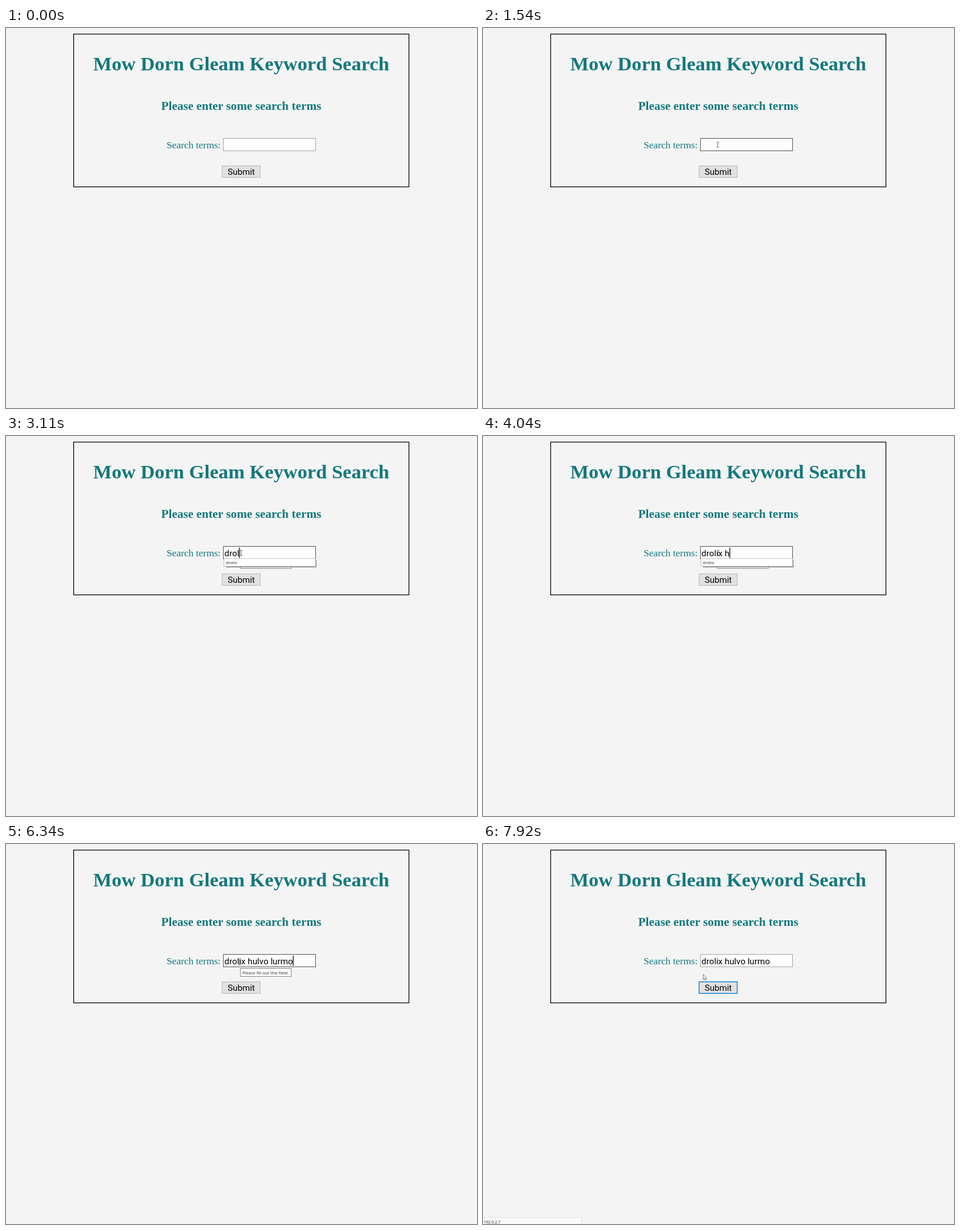
Animation of 833 by 673 pixels, one loop 7.99 s. Source, as an HTML page:

```html
<!DOCTYPE html>
<html lang="en">
<head>
<meta charset="utf-8">
<title>Keyword Search</title>
<style>
  html, body { margin: 0; width: 100%; height: 100%; overflow: hidden; background: #f4f4f4; }
  svg { display: block; width: 833px; height: 673px; }
  .serif { font-family: "Liberation Serif", serif; fill: #13787e; }
  .bold { font-weight: 700; }
  .mid { text-anchor: middle; }
  .ui { font-family: Roboto, sans-serif; font-size: 15.3px; fill: #000; }
  .small { font-family: "Noto Sans", sans-serif; font-size: 7.6px; fill: #333; }
  .crisp { shape-rendering: crispEdges; }
</style>
</head>
<body>
<svg viewBox="0 0 833 673">
  <rect width="833" height="673" fill="#f4f4f4"/>
  <rect x="119.6" y="10.8" width="593" height="270.6" fill="none" stroke="#000" stroke-width="1.3"/>
  <text class="serif bold mid" x="416" y="75" font-size="34.7">Mow Dorn Gleam Keyword Search</text>
  <text class="serif bold mid" x="416" y="145" font-size="21.4">Please enter some search terms</text>
  <text class="serif" x="284" y="213" font-size="17.5">Search terms:</text>

  <rect id="field" x="384.5" y="195.5" width="163" height="22" fill="#fff"/>
  <text id="query" class="ui" x="386.3" y="213" xml:space="preserve"></text>
  <rect id="caret" y="197.5" width="1.3" height="18.5"/>

  <rect id="button" x="382.2" y="244.2" width="67.4" height="20.4"/>
  <text class="ui mid" x="416" y="260.3">Submit</text>

  <g id="tip">
    <rect class="crisp" x="414.5" y="220.5" width="90" height="14" fill="#fff" stroke="#858585"/>
    <text class="small" x="418" y="231">Please fill out this field.</text>
  </g>
  <g id="list">
    <path d="M389 231.5H548V219" fill="none" stroke="#777" stroke-opacity=".75" stroke-width="2.4"/>
    <rect x="385.3" y="217" width="162.2" height="13.8" fill="#fff" stroke="#aaa" stroke-width=".8"/>
    <text class="small" x="388.5" y="227">drolix</text>
  </g>
  <g id="status">
    <rect class="crisp" x="-.5" y="661.5" width="175" height="13" fill="#f9f9f9" stroke="#e2e2e2"/>
    <text class="small" x="1" y="671.5" style="font-size:7.1px">192.0.2.7</text>
  </g>

  <path id="beam" d="M-2-4.5H2M0-4.5V4.5M-2 4.5H2" fill="none" stroke="#666" stroke-width="1"/>
  <path id="arrow" d="M0 0V9.2L2.1 7.3L3.6 10.6L5 10L3.6 6.8H6.3Z" fill="#fff" stroke="#555" stroke-width=".8"/>
</svg>
<script>
const LOOP = 7990;
const QUERY = "drolix hulvo lurmo";
const $ = id => document.getElementById(id);

// Each track is a list of [start time, ...values], held until the next entry.
const typing = [ // letters typed, caret visible
  [0, 0, 0], [1070, 0, 1], [1540, 0, 0], [1920, 1, 1], [2090, 2, 1], [2550, 2, 0],
  [2870, 3, 1], [3110, 4, 1], [3340, 5, 1], [3480, 6, 1], [3650, 7, 1],
  [4040, 8, 1], [4200, 9, 1], [4280, 10, 1], [4440, 11, 1], [4520, 12, 1],
  [4680, 13, 0], [4910, 14, 1], [5070, 15, 1], [5150, 16, 1], [5240, 16, 0],
  [5320, 17, 1], [5470, 18, 1], [5730, 18, 0], [6200, 18, 1], [6810, 18, 0]
];
const pointer = [ // shape, x, y
  [0, "", 0, 0], [210, "arrow", 2, 349], [290, "arrow", 130, 300], [370, "arrow", 265, 252],
  [450, "arrow", 358, 222], [530, "beam", 404, 208], [610, "beam", 414, 207],
  [760, "beam", 415, 206.5], [1920, "beam", 416, 207], [6270, "beam", 415, 208],
  [6340, "beam", 413, 209.5], [6420, "arrow", 408, 226], [6500, "arrow", 402, 240],
  [6580, "arrow", 399, 249], [7760, "arrow", 397, 246], [7840, "arrow", 393, 238],
  [7920, "arrow", 389.5, 230.8]
];
const fieldEdge = [
  [0, "#a2a2a2"], [530, "#7e7e7e"], [760, "#686868"], [830, "#505050"],
  [6420, "#7e7e7e"], [6500, "#a2a2a2"]
];
const buttonLook = [ // fill, edge, edge width
  [0, "#e1e1e1", "#b5b5b5", 1], [6580, "#e5f1fb", "#0078d7", 1],
  [6810, "#cce4f7", "#005499", 1], [6900, "#e5f1fb", "#0078d7", 1.3],
  [7840, "#e1e1e1", "#0078d7", 1.4]
];

const at = (track, t) => track.findLast(step => step[0] <= t).slice(1);
const show = (id, on) => $(id).style.display = on ? "" : "none";
const set = (id, attrs) => {
  for (const name in attrs) $(id).setAttribute(name, attrs[name]);
};

function draw(t) {
  const [count, caretOn] = at(typing, t);
  $("query").textContent = QUERY.slice(0, count);
  show("caret", caretOn);
  set("caret", { x: 386.2 + (count ? $("query").getComputedTextLength() : 0) });

  const [shape, x, y] = at(pointer, t);
  for (const id of ["arrow", "beam"]) {
    show(id, id === shape);
    set(id, { transform: `translate(${x} ${y})` });
  }

  const [fill, stroke, width] = at(buttonLook, t);
  set("button", { fill, stroke, "stroke-width": width });
  set("field", { stroke: at(fieldEdge, t)[0] });
  show("tip", t >= 1690 && t < 6420);
  show("list", t >= 2010 && t < 4120);
  show("status", t >= 7040);
}

const start = performance.now();
function tick() {
  draw((performance.now() - start) % LOOP);
  requestAnimationFrame(tick);
}
tick();
</script>
</body>
</html>
```
